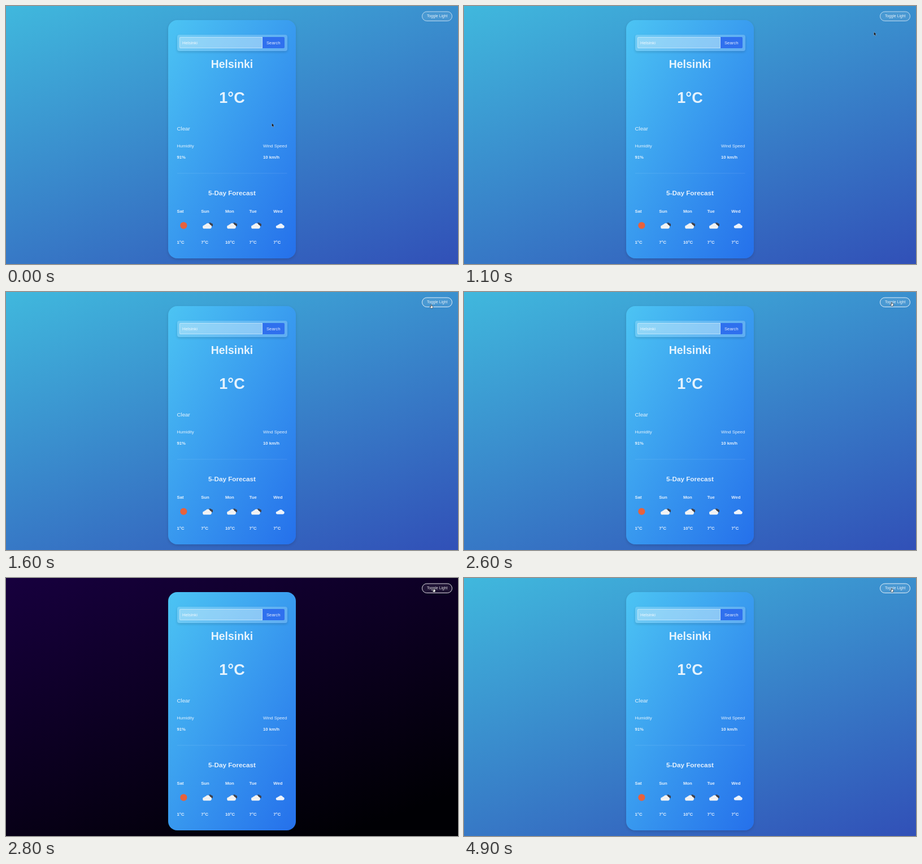
Recreate the animation shown at these times as an HTML page. Size 800 by 458 pixels, loop 6.8 s.

```html
<!DOCTYPE html>
<html lang="en">
<head>
<meta charset="utf-8">
<title>Weather card</title>
<style>
html, body { margin: 0; width: 100%; height: 100%; overflow: hidden; }
#stage {
  position: relative; width: 800px; height: 458px; overflow: hidden;
  background: linear-gradient(160deg, #40b8dd, #3150b7);
}
#stage.dark { background: linear-gradient(160deg, #17003e, #000004 90%); }
.card {
  position: absolute; left: 287px; top: 25px; width: 226px; height: 423px;
  border-radius: 16px;
  background: linear-gradient(120deg, #4cc4f3, #2570eb);
  box-shadow: 0 2px 5px rgba(0, 0, 0, .14);
}
.bar {
  position: absolute; left: 16px; top: 26px; width: 194.5px; height: 28.5px;
  border-radius: 4px; background: rgba(255, 255, 255, .2);
  box-shadow: 0 2px 4px rgba(0, 0, 0, .14);
}
.field {
  position: absolute; left: 4px; top: 4px; width: 147px; height: 20px;
  box-sizing: border-box; border: 1px solid rgba(255, 255, 255, .4);
  border-radius: 2px 0 0 2px; background: rgba(255, 255, 255, .25);
}
.go {
  position: absolute; left: 151px; top: 4px; width: 39px; height: 20px;
  border-radius: 0 2px 2px 0; background: #2f70ee;
}
svg { position: absolute; left: 0; top: 0; }
text { font-family: "Liberation Sans", Arial, sans-serif; fill: #fff; fill-opacity: .87; }
.b { font-weight: 700; }
</style>
</head>
<body>
<div id="stage">
  <div class="card">
    <div class="bar"><div class="field"></div><div class="go"></div></div>
  </div>
  <svg id="art" width="800" height="458" viewBox="0 0 800 458">
    <defs>
      <path id="cloud" d="M3 11.5a3 3 0 0 1-.3-6 2.6 2.6 0 0 1 2.6-1.8A4.3 4.3 0 0 1 13 4.6a3.5 3.5 0 0 1-.4 6.9z"/>
      <g id="broken">
        <path d="M8.5 4.2a2 2 0 0 1 2.2-2.2 2.5 2.5 0 0 1 4.4 0 2.6 2.6 0 0 1 2.7 2.6 2.4 2.4 0 0 1-2.4 2.6H12z" fill="#3f414c"/>
        <use href="#cloud" fill="#f1f2f3"/>
      </g>
    </defs>
    <rect id="pill" x="736.5" y="10" width="53" height="16.5" rx="8.25" fill="#fff" fill-opacity=".08" stroke="#fff"/>
    <path d="M303 297h194.5" stroke="#fff" stroke-opacity=".1"/>
    <circle cx="314.4" cy="389.6" r="6.1" fill="#e7623d"/>
    <use href="#broken" x="348.3" y="383.8"/>
    <use href="#broken" x="391.3" y="383.8"/>
    <use href="#broken" x="434.2" y="383.8"/>
    <use href="#cloud" fill="#edf3fb" transform="translate(477.9 384.8) scale(.94 .85)"/>
    <g id="words"></g>
    <g id="pointer">
      <path id="arrow" d="M0 0v6.2l1.4-1.2 1 2.2 1.1-.5-1-2.1h1.9z" fill="#080b12" stroke="#fff" stroke-opacity=".6" stroke-width=".5"/>
      <path id="hand" d="M-.6.6q.6-.9 1.2 0v2l2 .5q.6.3.5 1L2.5 7H-.6l-2-2.6q.1-.9.9-.4l1.1.7z" fill="#fff" stroke="#14161c" stroke-width=".6"/>
    </g>
  </svg>
</div>
<script>
const $ = id => document.getElementById(id);
const LOOP = 6800;

function say(str, x, y, size, cls = "", anchor = "start") {
  const el = document.createElementNS("http://www.w3.org/2000/svg", "text");
  const attrs = { x, y, "font-size": size, class: cls, "text-anchor": anchor };
  for (const k in attrs) el.setAttribute(k, attrs[k]);
  el.textContent = str;
  $("words").append(el);
}

say("Toggle Light", 763.2, 20.4, 6.75, "", "middle");
say("Helsinki", 312, 67.8, 7.7);
say("Search", 473.2, 67.8, 7.75, "", "middle");
say("Helsinki", 400, 110.3, 19.4, "b", "middle");
say("1°C", 400, 171.6, 27, "b", "middle");
say("Clear", 302.4, 220.8, 9.8);
say("Humidity", 302.4, 250.8, 7.75);
say("91%", 302.4, 270.6, 7.75, "b");
say("Wind Speed", 455, 250.8, 7.75);
say("10 km/h", 455, 270.6, 7.75, "b");
say("5-Day Forecast", 400, 336, 11.7, "b", "middle");
[["Sat", 1], ["Sun", 7], ["Mon", 10], ["Tue", 7], ["Wed", 7]].forEach(([day, deg], i) => {
  const x = 302.5 + i * 42.7;
  say(day, x, 366.8, 7.75, "b");
  say(deg + "°C", x, 421.8, 7.75, "b");
});

// time, x, y of the pointer tip
const path = [[0, 470.5, 208], [1100, 725.5, 46], [1900, 757, 18]];
const eases = [u => u * u * (3 - 2 * u) * .8 + u * .2, u => 1 - (1 - u) ** 2];

function pointerAt(t) {
  const i = t < path[1][0] ? 0 : 1;
  const [a, b] = [path[i], path[i + 1]];
  const u = eases[i](Math.min(1, (t - a[0]) / (b[0] - a[0])));
  return [a[1] + (b[1] - a[1]) * u, a[2] + (b[2] - a[2]) * u];
}

function draw(t) {
  const [x, y] = pointerAt(Math.floor(t / 100) * 100);
  const over = y < 26;
  $("pointer").setAttribute("transform", `translate(${x} ${y})`);
  $("arrow").style.display = over ? "none" : "";
  $("hand").style.display = over ? "" : "none";
  $("pill").setAttribute("stroke-opacity", over ? .85 : .65);
  $("stage").classList.toggle("dark", t >= 2800 && t < 4900);
}

const start = performance.now();
function tick() {
  draw((performance.now() - start) % LOOP);
  requestAnimationFrame(tick);
}
tick();
</script>
</body>
</html>
```
